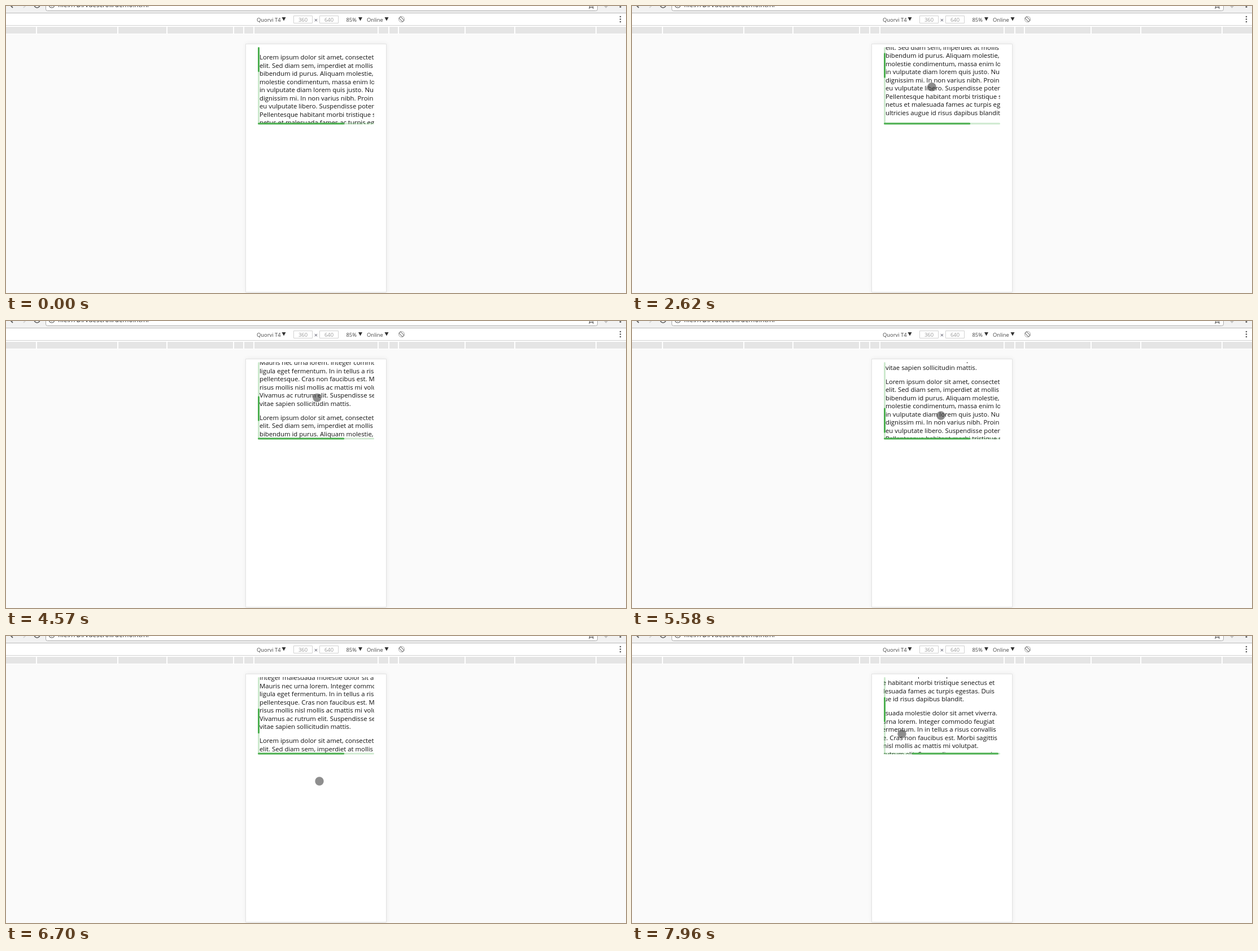
An HTML page with a canvas that plays this animation: 1098x510 px, repeating every 8000 ms.

```html
<!DOCTYPE html>
<html lang="en">
<head>
<meta charset="utf-8">
<title>Scroll demo</title>
<style>
html, body { margin: 0; width: 100%; height: 100%; overflow: hidden; background: #fafafa; }
canvas { display: block; width: 1098px; height: 510px; }
</style>
</head>
<body>
<canvas id="stage" width="1098" height="510"></canvas>
<script>
const ctx = document.getElementById('stage').getContext('2d');
const LOOP = 8000, ENTER = 1350, STEP = 79;
const FONT = '"Open Sans", "Noto Sans", sans-serif';
const GREEN = '#4caf50', TRACK = 'rgba(76,175,80,.28)';
const VIEW = { x: 446, y: 73, w: 206, h: 137 };
const PAGE = { w: 277, h: 423 };
const LINE = 14.5, GAP = 25;

const lorem = [
  'Lorem ipsum dolor sit amet, consectetur adipiscing',
  'elit. Sed diam sem, imperdiet at mollis vestibulum,',
  'bibendum id purus. Aliquam molestie, leo sed',
  'molestie condimentum, massa enim lobortis massa,',
  'in vulputate diam lorem quis justo. Nullam nec',
  'dignissim mi. In non varius nibh. Proin et nunc',
  'eu vulputate libero. Suspendisse potenti.',
  'Pellentesque habitant morbi tristique senectus et',
  'netus et malesuada fames ac turpis egestas. Duis',
  'ultricies augue id risus dapibus blandit.'
];
const integer = [
  'Integer malesuada molestie dolor sit amet viverra.',
  'Mauris nec urna lorem. Integer commodo feugiat',
  'ligula eget fermentum. In in tellus a risus convallis',
  'pellentesque. Cras non faucibus est. Morbi sagittis',
  'risus mollis nisl mollis ac mattis mi volutpat.',
  'Vivamus ac rutrum elit. Suspendisse semper orci',
  'vitae sapien sollicitudin mattis.'
];

const drag = (start, end, x0, y0, x1, y1) =>
  ({ start, end, from: { x: x0, y: y0 }, to: { x: x1, y: y1 } });

// Finger strokes; between them the pointer glides to the next press
const drags = [
  drag(2380, 2850, 529, 175.5, 533, 112.5),
  drag(3150, 3470, 542, 180, 542, 85),
  drag(4330, 4810, 549, 165, 553, 107),
  drag(5185, 5580, 548, 203, 547, 168),
  drag(6150, 6700, 556, 179.5, 555, 258),
  drag(6930, 7230, 560, 159, 573, 207),
  drag(7723, 7960, 545, 159, 478, 174)
];

const smooth = f => f * f * (3 - 2 * f);
const mix = (a, b, f) => ({ x: a.x + (b.x - a.x) * f, y: a.y + (b.y - a.y) * f });

// Progress from start to end, advancing in screen updates
function progress(t, start, end) {
  const ticks = Math.floor((t - start) / STEP + 0.15);
  return Math.min(1, Math.max(0, ticks * STEP / (end - start)));
}

function stateAt(t) {
  const s = { left: 0, top: 0, pointer: null };
  if (t < ENTER) return s;
  let last = { x: 973, y: 498 }, since = ENTER;
  for (const { start, end, from, to } of drags) {
    if (t < start) {
      s.pointer = mix(last, from, smooth(progress(t, since, start)));
      return s;
    }
    s.pointer = mix(from, to, progress(t, start, end));
    s.top += from.y - s.pointer.y;
    if (Math.abs(to.x - from.x) > Math.abs(to.y - from.y)) s.left += from.x - s.pointer.x;
    last = to;
    since = end;
    if (t < end) break;
  }
  return s;
}

function rect(x, y, w, h, fill) {
  ctx.fillStyle = fill;
  ctx.fillRect(x, y, w, h);
}

function paint(fill, stroke, width) {
  if (fill) { ctx.fillStyle = fill; ctx.fill(); }
  if (stroke) { ctx.strokeStyle = stroke; ctx.lineWidth = width; ctx.stroke(); }
}

function pill(x, y, w, h, r, fill, stroke) {
  ctx.beginPath();
  ctx.roundRect(x, y, w, h, r);
  paint(fill, stroke, 1);
}

function poly(points, fill, stroke, width = 1) {
  ctx.beginPath();
  points.forEach(([x, y]) => ctx.lineTo(x, y));
  if (fill) ctx.closePath();
  paint(fill, stroke, width);
}

function disc(x, y, r, fill, stroke, width = 1) {
  ctx.beginPath();
  ctx.arc(x, y, r, 0, Math.PI * 2);
  paint(fill, stroke, width);
}

function star(x, y, r, color) {
  const points = Array.from({ length: 11 }, (_, i) => {
    const a = i * Math.PI / 5 - Math.PI / 2, d = i % 2 ? r * 0.45 : r;
    return [x + d * Math.cos(a), y + d * Math.sin(a)];
  });
  poly(points, null, color, 1.1);
}

function label(text, x, y, size, color, align = 'left') {
  ctx.font = `${size}px ${FONT}`;
  ctx.textAlign = align;
  ctx.fillStyle = color;
  ctx.fillText(text, x, y);
}

function dots(x, y, gap, count, r) {
  for (let i = 0; i < count; i++) disc(x, y + i * gap, r, '#5a5a5a');
}

function drawBrowserBar() {
  rect(0, 0, 1098, 12, '#f2f2f2');
  rect(0, 12, 1098, 1, '#b8b8b8');
  poly([[12, 3], [7, -2]], null, '#5a5a5a', 1.8);
  poly([[31, 3], [36, -2]], null, '#d4d4d4', 1.8);
  disc(55, -2, 5, null, '#5a5a5a', 1.6);
  pill(70.5, -20, 977, 28.5, 3, '#fff', '#a8a8a8');
  disc(81, -2, 5, null, '#5a5a5a', 1.1);
  rect(80.5, -3, 1, 4, '#5a5a5a');
  label('file:///D:/vuescroll/demo.html', 92, 2, 11.7, '#333');
  star(1036.5, -1, 6, '#5a5a5a');
  poly([[1059, 0], [1066, 0], [1062.5, 4]], '#c4c4c4');
  dots(1088, 1.5, 0, 1, 1.5);
}

function drawDeviceBar() {
  rect(0, 13, 1098, 37, '#fff');
  rect(0, 34, 1098, 1, '#d0d0d0');
  rect(0, 37, 1098, 12, '#e5e5e5');
  for (const d of [110, 128.5, 146, 264, 351.5, 495.5])
    for (const x of [549 - d, 549 + d]) rect(Math.round(x) - 1, 37, 2, 12, '#fff');

  const menu = (text, x, arrow) => {
    label(text, x, 27.5, 9.4, '#444');
    poly([[arrow - 3.5, 20], [arrow + 3.5, 20], [arrow, 26.5]], '#333');
  };
  menu('Quorvi T4', 444, 492);
  menu('85%', 602.5, 627.5);
  menu('Online', 639, 674);

  const field = (text, x) => {
    pill(x, 17.5, 33, 13, 0, '#fff', '#d2d2d2');
    label(text, x + 16.5, 27.5, 9.4, '#999', 'center');
  };
  field('360', 509.5);
  field('640', 555.5);
  label('×', 549, 28.5, 11, '#556', 'center');

  ctx.save();
  ctx.translate(700.5, 23.5);
  disc(0, 0, 5, null, '#999', 0.9);
  ctx.rotate(-Math.PI / 4);
  pill(-2, -4.5, 4, 9, 1, '#fff', '#777');
  ctx.restore();
  dots(1088, 19, 4.5, 3, 1.3);
}

function drawPhone() {
  ctx.save();
  ctx.shadowColor = 'rgba(0,0,0,.07)';
  ctx.shadowBlur = 8;
  rect(425, 67, 249, 442, '#fff');
  ctx.restore();
  pill(424.5, 67.5, 249, 441, 0, '#fff', '#e2e2e2');
}

function drawContent(s) {
  ctx.save();
  ctx.beginPath();
  ctx.rect(VIEW.x, VIEW.y, VIEW.w, VIEW.h);
  ctx.clip();
  let y = 95 - s.top;
  for (const para of [lorem, integer, lorem]) {
    para.forEach((text, i) =>
      label(text, 449 - s.left, Math.round(y + i * LINE), 11.33, '#111'));
    y += (para.length - 1) * LINE + GAP;
  }
  ctx.restore();

  const kx = VIEW.w / PAGE.w, ky = VIEW.h / PAGE.h;
  const floor = VIEW.y + VIEW.h - 2.6;
  pill(VIEW.x, VIEW.y, 3, VIEW.h, 1.5, TRACK);
  pill(VIEW.x, floor, VIEW.w, 3, 1.5, TRACK);
  pill(VIEW.x, VIEW.y + s.top * ky, 3, VIEW.h * ky, 1.5, GREEN);
  pill(VIEW.x, floor, 0, 0, 0);
  pill(VIEW.x + s.left * kx, floor, VIEW.w * kx, 3.2, 1.5, GREEN);
}

function drawPointer({ x, y }) {
  if (x > 425 && x < 674) {
    disc(x, y, 7.7, 'rgba(60,60,60,.58)');
    return;
  }
  poly([[x, y], [x, y + 16], [x + 4, y + 12], [x + 11, y + 11.6], [x, y]], '#fff', '#000');
}

function draw(t) {
  const s = stateAt(t % LOOP);
  rect(0, 0, 1098, 510, '#fafafa');
  drawBrowserBar();
  drawDeviceBar();
  drawPhone();
  drawContent(s);
  if (s.pointer) drawPointer(s.pointer);
}

const begin = performance.now();
function tick() {
  draw(performance.now() - begin);
  requestAnimationFrame(tick);
}
tick();
</script>
</body>
</html>
```
